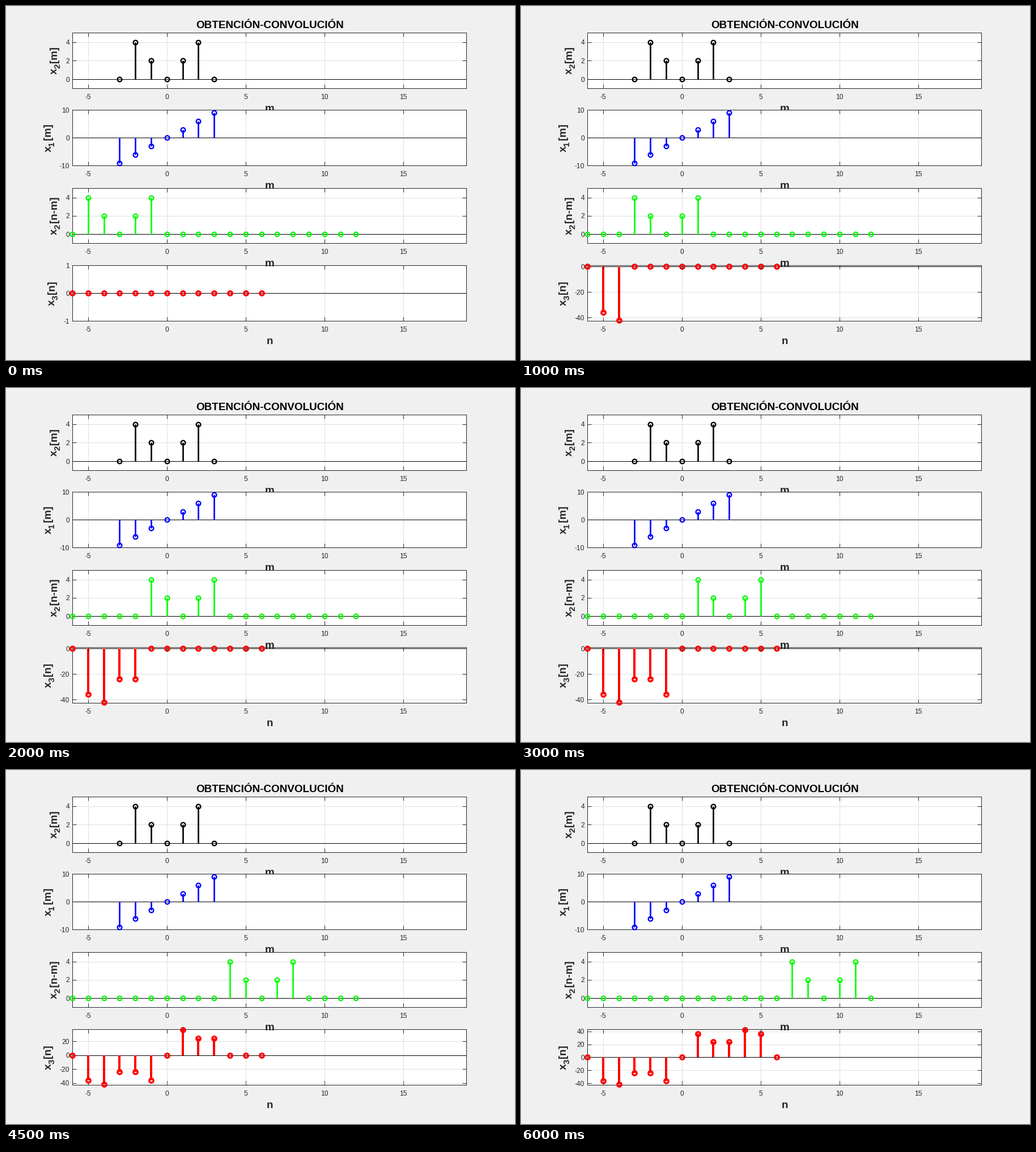
Write a matplotlib script that moves like this. It is 898 by 624 pixels and loops after 6.5 s.

```python
import numpy as np
import matplotlib.pyplot as plt
from matplotlib.animation import FuncAnimation

W, H, DPI = 898, 624, 64
PX = 72 / DPI                      # points per pixel
LEFT, RIGHT = 117, 812
INK = "#262626"
BIG, SMALL, SUB = 18.7, 12, 15     # font sizes in pixels
XTICKS = [-5, 0, 5, 10, 15]
EM = {"x": .556, "[": .333, "]": .333, "m": .889, "n": .611, "-": .333}

plt.rcParams.update({
    "font.family": "Liberation Sans",
    "axes.unicode_minus": False,
    "axes.linewidth": PX,
    "axes.edgecolor": INK,
})


def x1(m):
    return np.where(abs(m) <= 3, 3 * m, 0)


def x2(m):
    return np.where(abs(m) <= 2, 2 * abs(m), 0)


M = np.arange(-3, 4)
SHIFTED = np.arange(-6, 13)
N = np.arange(-6, 7)
CONV = np.array([np.sum(x1(M) * x2(n - M)) for n in N])

fig = plt.figure(figsize=(W / DPI, H / DPI), dpi=DPI, facecolor="#f0f0f0")


def put(x, y, s, size=BIG, **kw):
    return fig.text(x / W, 1 - y / H, s, fontsize=size * PX, weight="bold",
                    va="baseline", **{"color": INK, **kw})


def panel(top, bottom, ylim, yticks):
    # the small offsets make lines snap to the named pixel rows and columns
    box = [(LEFT + .05) / W, (H - .4 - bottom) / H,
           (RIGHT - LEFT) / W, (bottom - top) / H]
    ax = fig.add_axes(box)
    ax.set(xlim=(-6, 19), ylim=ylim, xticks=XTICKS, yticks=yticks)
    ax.set_axisbelow(True)
    ax.grid(color="#dfdfdf", lw=PX)
    ax.tick_params(direction="in", right=True, length=7 * PX, width=PX,
                   color=INK, labelcolor=INK, labelsize=SMALL * PX)
    ax.tick_params(axis="x", pad=9.2 * PX)
    ax.tick_params(axis="y", pad=5 * PX)
    # top ticks lie over the stems
    ax.plot(XTICKS, np.ones(5), ls="", marker=3, ms=7 * PX, mew=PX, color=INK,
            transform=ax.get_xaxis_transform(), zorder=5)
    ax.axhline(0, color="black", lw=PX, zorder=2.2)
    return ax


def ylabel(x, mid, sub, arg):
    """Rotated x_sub[arg]; x is the baseline, mid the vertical centre."""
    tail = f"[{arg}]"
    parts = [("x", BIG, 0, EM["x"] * BIG),
             (sub, SUB, 6, .556 * SUB + 2),
             (tail, BIG, 0, sum(EM[c] for c in tail) * BIG)]
    y = mid + sum(p[3] for p in parts) / 2
    texts = []
    for s, size, drop, width in parts:
        t = put(x + drop, y, s, size, ha="left", rotation=90,
                rotation_mode="anchor")
        texts.append((t, drop))
        y -= width
    return texts


def move_label(texts, x):
    for t, drop in texts:
        t.set_x((x + drop) / W)


def stem(ax, color, width, edge, radius):
    bars, = ax.plot([], [], color=color, lw=width * PX, clip_on=False,
                    solid_capstyle="butt", snap=True, zorder=3)
    dots, = ax.plot([], [], "o", mec=color, mfc="none", mew=edge * PX,
                    ms=2 * radius * PX, clip_on=False, zorder=3.1)
    return bars, dots


def set_stem(parts, x, y):
    bars, dots = parts
    gap = np.full(len(x), np.nan)
    bars.set_data(np.column_stack([x, x, gap]).ravel(),
                  np.column_stack([0 * y, y, gap]).ravel())
    dots.set_data(x, y)


THIN = (2.67, 2.3, 3.85)
THICK = (4, 3.4, 3.7)

ax_a = panel(47, 145, (-1, 5), [0, 2, 4])
ax_b = panel(183, 281, (-10, 10), [-10, 0, 10])
ax_c = panel(321, 418, (-1, 5), [0, 2, 4])
ax_d = panel(457, 555, (-1, 1), [-1, 0, 1])

set_stem(stem(ax_a, "black", *THIN), M, x2(M))
set_stem(stem(ax_b, "blue", *THIN), M, x1(M))
moving = stem(ax_c, "lime", *THIN)
result = stem(ax_d, "red", *THICK)

put(465.3, 38.6, "OBTENCIÓN-CONVOLUCIÓN", 18.9, ha="center", color="black")
# the first two axis names are partly covered by the next panel
put(465, 186, "m", ha="center", zorder=-1)
put(465, 322, "m", ha="center", zorder=-1)
put(465, 459, "m", ha="center")
put(465, 596.5, "n", ha="center")
ylabel(90, 95.5, "2", "m")
ylabel(79.5, 232, "1", "m")
ylabel(90, 369.5, "2", "n-m")
label_d = ylabel(86, 506, "3", "n")


def draw(k):
    set_stem(moving, SHIFTED, x2(SHIFTED - (k - 3)))
    y = np.where(N <= N[k], CONV, 0)
    set_stem(result, N, y)

    if k == 0:
        low, high, step = -1, 1, 1
    else:
        pad = .02 * abs(y).max()
        low, high = y.min() - pad, y.max() + pad
        step = 10 if high - low < 40 else 20
    ax_d.set_ylim(low, high)
    ax_d.set_yticks(np.arange(np.ceil(low / step),
                              np.floor(high / step) + 1).astype(int) * step)
    move_label(label_d, 86 if k == 0 else 79.5)
    return []


anim = FuncAnimation(fig, draw, frames=len(N), interval=500, repeat=True)
plt.show()
```
